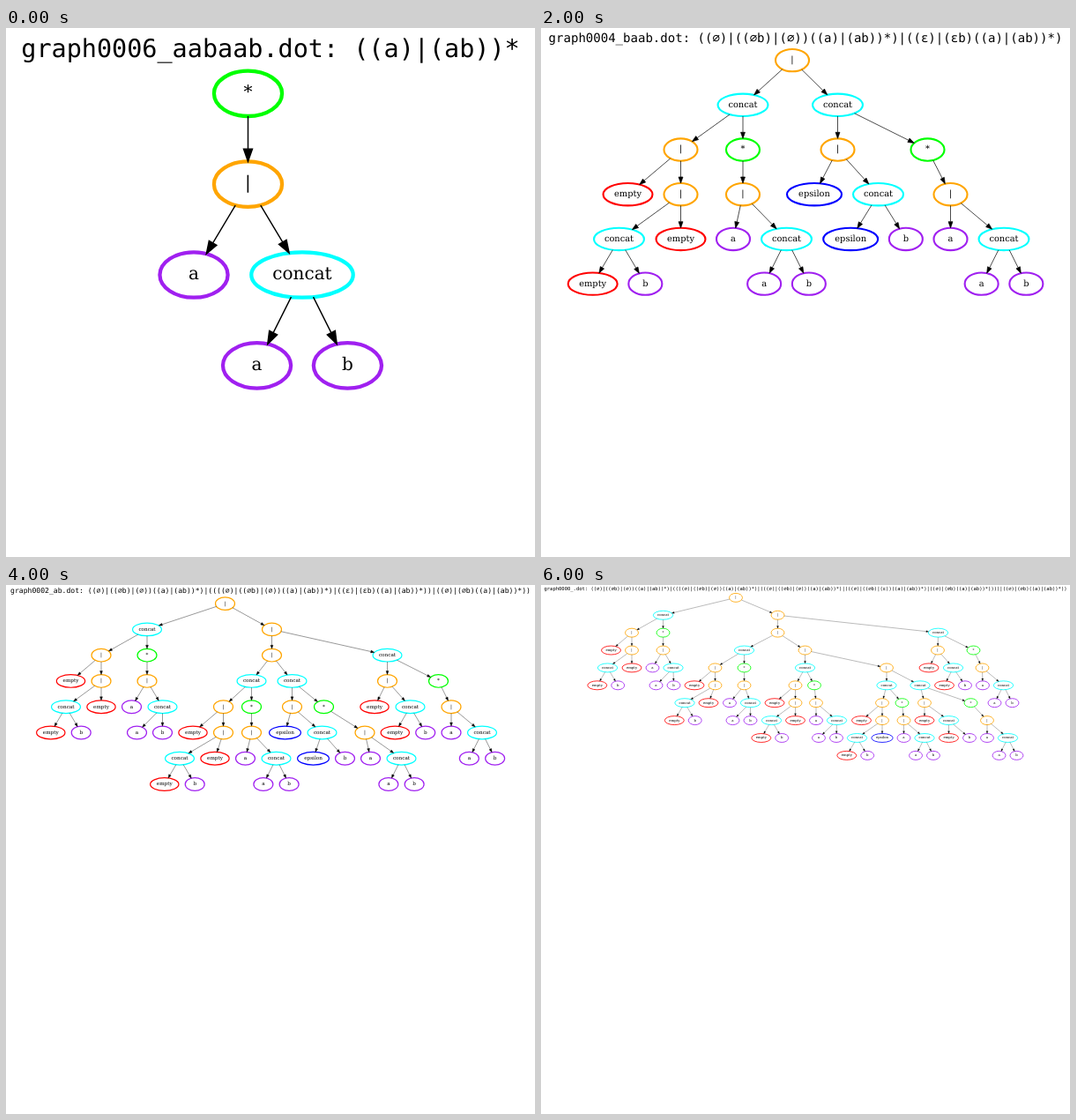
An HTML page that plays this animation: 600 by 600 pixels, repeating every 7000 ms.

```html
<!DOCTYPE html>
<html lang="en">
<head>
<meta charset="utf-8">
<title>Regex syntax trees</title>
<style>
  html, body { margin: 0; width: 100%; height: 100%; overflow: hidden; background: #fff; }
  svg { display: block; width: 100vw; height: 100vh; }
  text { text-anchor: middle; text-rendering: geometricPrecision; }
  .title { font: 19.93px "DejaVu Sans Mono", monospace; }
  .label { font: 14px "DejaVu Serif", serif; }
  ellipse { fill: none; stroke-width: 3; }
  .edge { stroke: #000; stroke-width: 1; }
</style>
</head>
<body>
<svg id="stage" viewBox="0 0 600 600"></svg>
<script>
const STAGE = 600, HOLD = 1000;
// Layout in points; each scene is scaled so that its title fills the stage.
const RANK = 72, TOP = 52, RY = 18, GAP = 18, HEAD = 10;

// Symbol: label, outline colour, horizontal radius, number of children, title text
const KINDS = {
  '|': { label: '|', color: '#ffa500', rx: 27, arity: 2 },
  '.': { label: 'concat', color: '#00ffff', rx: 40.4, arity: 2 },
  '*': { label: '*', color: '#00ff00', rx: 27, arity: 1 },
  n: { label: 'empty', color: '#ff0000', rx: 39.7, arity: 0, text: '∅' },
  e: { label: 'epsilon', color: '#0000ff', rx: 44, arity: 0, text: 'ε' },
  a: { label: 'a', color: '#a020f0', rx: 27, arity: 0, text: 'a' },
  b: { label: 'b', color: '#a020f0', rx: 27, arity: 0, text: 'b' }
};

// Trees in prefix order: symbol and optional x on the stage.
// Without x, a single child hangs straight down and a pair is centred.
const SCENES = [
  ['graph0006_aabaab.dot', '*274.5 | a213 .336 a b'],
  ['graph0005_abaab.dot', `.293 |250 e128 .250 e148 b254
    *344.5 |352.5 a348 .450 a b`],
  ['graph0004_baab.dot', `|285 .229 |158.5 n98.5 |158.5 .88.5 n b n158.5
    *229 | a218 .278.5 a b
    .336.5 |336.5 e310 .382.5 e b *438.5 |464.5 a464.5 .525 a b`],
  ['graph0003_aab.dot', `|243 .174.5 |110.5 n68 |110.5 .61 n b n110.5
    *174.5 | a153 .196 a160 b196
    |312.5 .312.5 |290.5 n247.5 |290.5 .239 n b e290.5 *331 |335 a335 .378 a b
    .414 |414 n395.5 .445 n427.5 b469.5 *487 |505.5 a505.5 .548.5 a b`],
  ['graph0002_ab.dot', `|248.5 .160 |108 n73.5 |108 .68 n b n108
    *160 | a142.5 .177.5 a148.5 b177.5
    |301.5 |301.5 .278.5 |246.5 n212 |246.5 .197 n b n237 *278.5 | a271.5 .306.5 a b
    .324.5 |324.5 e316.5 .358.5 e348.5 b384.5 *360.5 |407 a413.5 .448.5 a b
    .432.5 |432.5 n418 .458.5 n b *490.5 |505 a505 .540 a b`],
  ['graph0001_b.dot', `|204 .156.5 |114.5 n86.5 |114.5 .82 n b n114.5
    *156.5 | a142.5 .171 a147 b171
    |302.5 |302.5 .266.5 |226.5 n198.5 |226.5 .186 n b n218 *266.5 | a246.5 .274.5 a250.5 b274.5
    |347 .347 |335 n307 |335 .302.5 n b n335 *361 |362.5 a363 .391.5 a b
    .392 |392 e392 .425.5 e425 b454.5 *416 |478 a478 .506.5 a b
    .440 |440 n429.5 .461.5 n443.5 b471.5 *485 |495 a495 .523.5 a512.5 b536.5`],
  ['graph0000_.dot', `|221 .138.5 |103 n79.5 |103 .75.5 n b n103
    *138.5 | a126.5 .150 a130.5 b150.5
    |268.5 |268.5 .230.5 |197.5 n174 |197.5 .163 n b n190 *230.5 | a214 .237.5 a217.5 b237.5
    |299.5 .299.5 |288.5 n265 |288.5 .261.5 n b n288.5 *310 |312 a312 .335.5 a315 b335
    |392 .392 |387 n363.5 |387 .358.5 n b e387 *409.5 |411.5 a411.5 .435 a b
    .430 |435 n435 .462.5 n462.5 b486 *487.5 |506 a506 .529.5 a b
    .450.5 |450 n440 .467.5 n457.5 b481 *490.5 |500.5 a501 .524.5 a514.5 b534.5`]
];

function parse(source) {
  const tokens = source.split(/\s+/);
  const read = depth => {
    const token = tokens.shift();
    const node = { symbol: token[0], kind: KINDS[token[0]], depth, kids: [] };
    if (token.length > 1) node.px = Number(token.slice(1));
    while (node.kids.length < node.kind.arity) node.kids.push(read(depth + 1));
    return node;
  };
  return read(0);
}

function regex({ symbol, kind, kids }) {
  const parts = kids.map(regex);
  if (symbol === '|') return `(${parts[0]})|(${parts[1]})`;
  if (symbol === '*') return `(${parts[0]})*`;
  return kind.text || parts.join('');
}

function place(node, scale, fallback) {
  node.x = node.px === undefined ? fallback : node.px / scale;
  node.y = TOP + RANK * node.depth;
  const [left, right] = node.kids;
  const half = right ? (left.kind.rx + right.kind.rx + GAP) / 2 : 0;
  node.kids.forEach((kid, i) => place(kid, scale, node.x + (i ? half : -half)));
}

function edge(from, to) {
  const dx = to.x - from.x, dy = to.y - from.y, length = Math.hypot(dx, dy);
  const ux = dx / length, uy = dy / length;
  const reach = node => 1 / Math.hypot(dx / node.kind.rx, dy / RY);
  const start = reach(from), end = reach(to);
  const tipX = to.x - dx * end, tipY = to.y - dy * end;
  const baseX = tipX - ux * HEAD, baseY = tipY - uy * HEAD;
  const wx = -uy * HEAD * 0.35, wy = ux * HEAD * 0.35;
  return `<path class="edge" d="M${from.x + dx * start} ${from.y + dy * start}L${baseX} ${baseY}
    M${tipX} ${tipY}L${baseX + wx} ${baseY + wy}L${baseX - wx} ${baseY - wy}Z"/>`;
}

function draw(node) {
  const { x, y, kind, kids } = node;
  return `<ellipse cx="${x}" cy="${y}" rx="${kind.rx}" ry="${RY}" stroke="${kind.color}"/>
    <text class="label" x="${x}" y="${y + 3.4}">${kind.label}</text>`
    + kids.map(kid => draw(kid) + edge(node, kid)).join('');
}

function scene([file, source]) {
  const tree = parse(source);
  const title = `${file}: ${regex(tree)}`;
  const width = 12 * title.length + 24;
  const scale = STAGE / width;
  place(tree, scale);
  return `<g transform="scale(${scale})">
    <text class="title" x="${width / 2}" y="23.3">${title}</text>${draw(tree)}</g>`;
}

const stage = document.getElementById('stage');
stage.innerHTML = SCENES.map(scene).join('');
const groups = [...stage.children];

function show(time) {
  const current = Math.floor(time / HOLD) % groups.length;
  groups.forEach((group, i) => { group.style.display = i === current ? '' : 'none'; });
}

const begin = performance.now();
function tick() {
  show(performance.now() - begin);
  requestAnimationFrame(tick);
}
tick();
</script>
</body>
</html>
```
